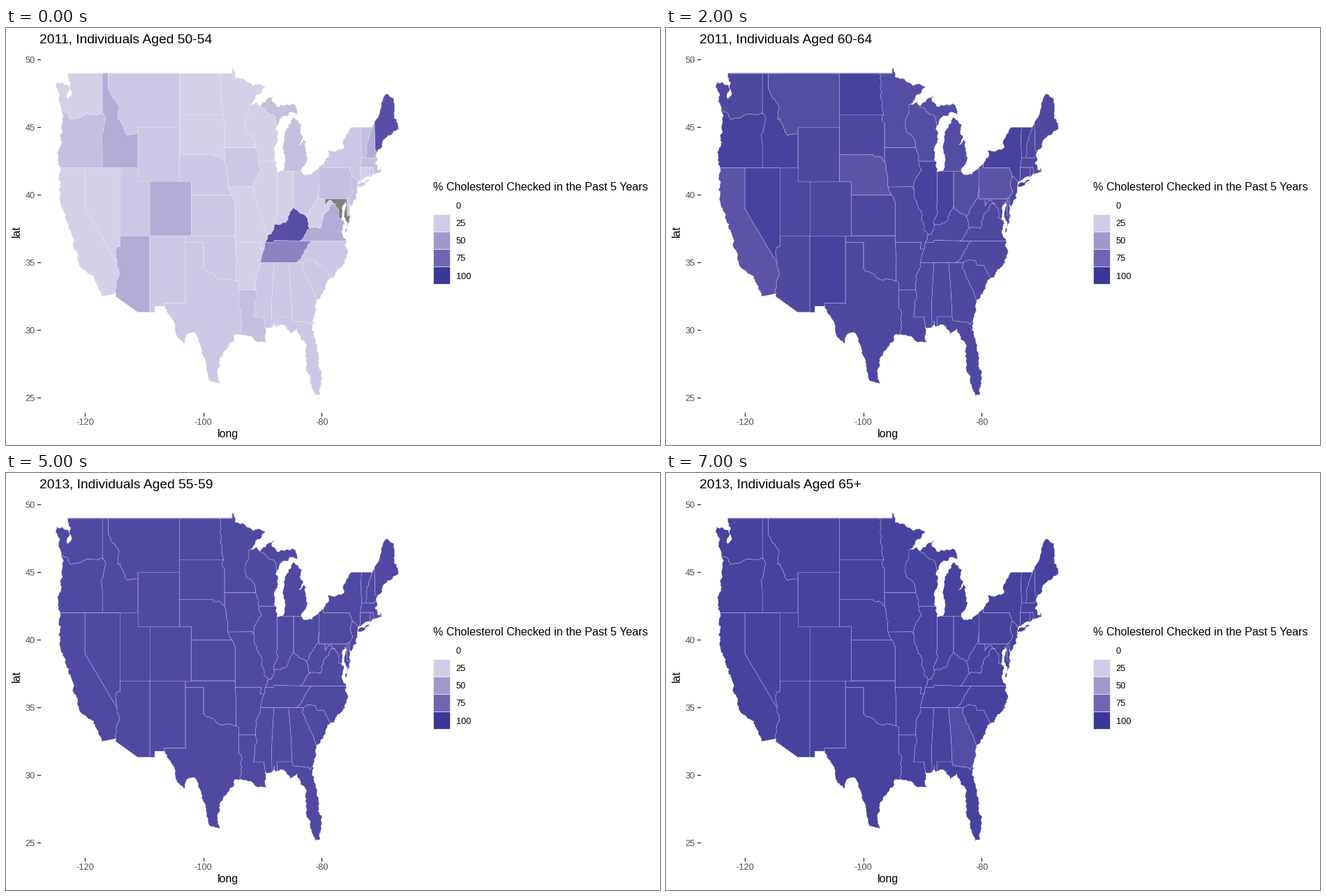
Animation, 937 px wide and 598 px high, one loop 8 s. Source, as a matplotlib script:

```python
import random
from itertools import product

import matplotlib.pyplot as plt
from matplotlib.animation import FuncAnimation
from matplotlib.collections import LineCollection, PolyCollection
from matplotlib.colors import LinearSegmentedColormap
from matplotlib.patches import Rectangle

W, H, DPI = 937, 598, 64
PT = 72 / DPI
plt.rcParams["font.family"] = "Liberation Sans"
rng = random.Random(5)
borders = []  # (states on either side, path in pixels)
pen = (0, 0)


def px(west, lat):
    """Degrees west and degrees north to stage pixels."""
    return 112.8 + (120 - west) * 8.49, 45.2 + (50 - lat) * 19.41


def wiggle(a, b, amp):
    """Points after a up to b, roughened by midpoint displacement."""
    dx, dy = b[0] - a[0], b[1] - a[1]
    size = (dx * dx + dy * dy) ** 0.5
    if size < 3:
        return [b]
    k = rng.uniform(-amp, amp) * min(1, 8 / size)
    mid = ((a[0] + b[0]) / 2 - dy * k, (a[1] + b[1]) / 2 + dx * k)
    return wiggle(a, mid, amp) + wiggle(mid, b, amp)


def move(west, lat):
    global pen
    pen = west, lat


def leg(states, *key, amp=0):
    """Draw a border from the pen through the key points."""
    path = [px(*pen)]
    for point in zip(key[::2], key[1::2]):
        end = px(*point)
        path += wiggle(path[-1], end, amp) if amp else [end]
        move(*point)
    borders.append((states.split(), path))


def river(states, *key):
    leg(states, *key, amp=0.2)


def coast(states, *key):
    leg(states, *key, amp=0.25)


def ew(states, west):
    leg(states, west, pen[1])


def ns(states, lat):
    leg(states, pen[0], lat)


def rings(state):
    """Join the borders of one state into closed rings."""
    left = [path for names, path in borders if state in names]
    found = []
    while left:
        ring = left.pop(0)
        while left and ring[0] != ring[-1]:
            x, y = ring[-1]
            gap = lambda p: abs(p[0] - x) + abs(p[1] - y)
            path = min(left, key=lambda q: min(gap(q[0]), gap(q[-1])))
            left.remove(path)
            ring = ring + (path if gap(path[0]) <= gap(path[-1]) else path[::-1])[1:]
        found.append(ring)
    return found


def trace_outline():
    move(122.8, 49)
    coast("WA", 122.4, 48.2, 122.4, 47.3, 122.85, 47.1, 122.7, 48.1, 124.7, 48.38, 124, 46.3)
    coast("OR", 124.1, 44, 124.5, 42.85, 124.2, 42)
    coast("CA", 124.1, 41, 124.4, 40.4, 123.7, 39, 122.4, 37.4, 121.9, 36.5,
          120.6, 34.6, 118.5, 34, 117.1, 32.5)
    leg("CA", 114.7, 32.7)
    leg("AZ", 114.8, 32.5, 111.07, 31.33, 109.05, 31.33)
    ew("NM", 108.2)
    ns("NM", 31.78)
    ew("NM", 106.5)
    river("TX", 104.9, 30.6, 104.5, 29.6, 103.2, 29, 102.7, 29.7, 101.4, 29.8,
          100.3, 28.3, 99.5, 27.5, 99.1, 26.4, 97.2, 26)
    coast("TX", 97.5, 27.2, 97, 28.05, 95.1, 29.1, 94.8, 29.6, 93.8, 29.7)
    coast("LA", 91.8, 29.5, 90.8, 29.1, 89.1, 29.1, 89.6, 29.6, 89.6, 30.2)
    coast("MS", 88.4, 30.2)
    coast("AL", 88, 30.7, 87.9, 30.3, 87.5, 30.3)
    coast("FL", 86.4, 30.4, 85.3, 29.7, 84.2, 30.1, 82.8, 29.1, 82.7, 27.7, 81.8, 26,
          81.1, 25.15, 80.4, 25.2, 80, 26.8, 81.3, 29.8, 81.5, 30.7)
    coast("GA", 80.9, 32)
    coast("SC", 79.3, 33.1, 78.55, 33.85)
    coast("NC", 77.9, 33.9, 77.3, 34.5, 76.4, 34.8, 75.7, 35.6, 75.9, 36.6)
    coast("VA", 76.4, 37, 76.2, 37.9)
    coast("MD", 76.5, 38.9, 76.1, 39.5, 76.2, 38.6, 75.7, 37.95)
    coast("VA", 76, 37.2, 75.25, 38)
    coast("MD", 75.05, 38.45)
    coast("DE", 75.4, 39.2, 75.4, 39.8)
    coast("NJ", 75.5, 39.5, 74.9, 39, 74.1, 39.8, 74, 40.5, 73.9, 41)
    coast("NY", 73.9, 40.8, 73.65, 41)
    coast("CT", 71.85, 41.3)
    coast("RI", 71.4, 41.6, 71.1, 41.5)
    coast("MA", 70.6, 41.6, 69.95, 41.7, 70.2, 42.05, 70.1, 41.8, 70.6, 41.85, 71, 42.3,
          70.6, 42.65, 70.8, 42.9)
    coast("NH", 70.7, 43.1)
    coast("ME", 69.8, 43.8, 68.8, 44.4, 67, 44.85)
    river("ME", 67.45, 45.6, 67.8, 45.7, 67.8, 47.1, 69.2, 47.45, 70, 46.7, 70.3, 45.9, 71.1, 45.3)
    leg("NH", 71.5, 45)
    ew("VT", 73.3)
    ew("NY", 74.7)
    coast("NY", 76.3, 44.1, 76.2, 43.55, 77.5, 43.27, 79, 43.25, 78.9, 42.8, 79.76, 42.27)
    coast("PA", 80.52, 41.98)
    coast("OH", 81.7, 41.5, 82.7, 41.5, 83.45, 41.76)
    coast("MI", 82.5, 42.6, 82.6, 43.9, 83, 44.1, 83.9, 43.7, 83.3, 44.4, 83.4, 45.2,
          84.8, 45.75, 85.6, 45, 86.2, 44.7, 86.5, 43.7, 86.2, 42.7, 86.8, 41.76)
    coast("IN", 87.53, 41.7)
    coast("IL", 87.8, 42.5)
    coast("WI", 87.9, 43.1, 87.5, 44.4, 87.6, 45.1)
    coast("MI", 86.9, 45.7, 85.4, 46.1, 83.9, 45.95, 84.4, 46.5, 85, 46.75, 86.1, 46.65,
          87.4, 46.5, 88.4, 46.9, 87.8, 47.45, 90.4, 46.55)
    coast("WI", 90.8, 46.9, 92, 46.7)
    coast("MN", 91.2, 47.25, 89.5, 48)
    river("MN", 90.8, 48.2, 91.5, 48.07, 93, 48.55, 94.6, 48.7, 94.9, 49.35)
    leg("MN", 95.15, 49.35, 95.15, 49, 97.2, 49)
    ew("ND", 104.05)
    ew("MT", 116.05)
    ew("ID", 117.04)
    ew("WA", 122.8)
    # Long Island
    move(74, 40.6)
    coast("NY", 73.7, 40.85, 72.4, 41.1, 71.9, 41.07, 72.7, 40.75, 74, 40.6)


def trace_west():
    move(124, 46.3)
    river("WA OR", 122.9, 46.05, 122.5, 45.6, 121.1, 45.65, 119.2, 45.95, 116.92, 46)
    river("ID OR", 116.5, 45.5, 117.2, 44.4, 117.04, 43.8)
    ns("ID OR", 42)
    move(117.04, 49)
    ns("WA ID", 46.4)
    river("WA ID", 116.92, 46)
    move(124.2, 42)
    ew("OR CA", 120)
    ew("OR NV", 117.04)
    ew("ID NV", 114.05)
    ew("ID UT", 111.05)
    ns("ID WY", 44.5)
    river("ID MT", 112.8, 44.4, 113.4, 44.9, 114, 45.65, 114.5, 45.6, 114.35, 46.7,
          115.6, 47.4, 116.05, 48)
    ns("ID MT", 49)
    move(120, 42)
    ns("CA NV", 39)
    leg("CA NV", 114.6, 35)
    river("CA AZ", 114.2, 34.3, 114.7, 33.4, 114.7, 32.7)
    move(114.6, 35)
    river("NV AZ", 114.7, 36.1, 114.05, 36.2)
    ns("NV AZ", 37)
    ns("NV UT", 42)
    move(114.05, 37)
    ew("UT AZ", 109.05)
    ew("CO NM", 103.05)
    ew("CO OK", 102.05)
    ew("KS OK", 94.62)
    ns("MO OK", 36.5)
    leg("MO AR", 90.2, 36.5, 90.4, 36, 89.7, 36)
    move(109.05, 31.33)
    ns("AZ NM", 37)
    ns("UT CO", 41)
    ew("UT WY", 111.05)
    ns("UT WY", 42)
    move(109.05, 41)
    ew("CO WY", 104.05)
    ew("CO NE", 102.05)
    ns("CO NE", 40)
    ns("CO KS", 37)
    move(104.05, 49)
    ns("MT ND", 45.94)
    ns("MT SD", 45)
    ns("WY SD", 43)
    ns("WY NE", 41)
    move(104.05, 45)
    ew("MT WY", 111.05)
    ns("MT WY", 44.5)


def trace_plains():
    move(106.5, 31.78)
    leg("NM TX", 106.6, 32, 103.05, 32)
    ns("NM TX", 36.5)
    ns("NM OK", 37)
    move(103.05, 36.5)
    ew("OK TX", 100)
    ns("OK TX", 34.56)
    river("OK TX", 98.1, 34.1, 97.2, 33.75, 96, 33.8, 94.48, 33.64)
    river("AR TX", 94.04, 33.55)
    ns("AR TX", 33)
    ns("LA TX", 32)
    river("LA TX", 93.55, 31.15, 93.8, 29.7)
    move(94.62, 36.5)
    leg("AR OK", 94.43, 35.4, 94.48, 33.64)
    move(94.04, 33)
    ew("AR LA", 91.17)
    move(104.05, 45.94)
    ew("ND SD", 96.56)
    river("SD MN", 96.85, 45.6, 96.45, 45.3)
    ns("SD MN", 43.5)
    ns("SD IA", 42.5)
    move(97.2, 49)
    river("ND MN", 96.8, 46.9, 96.56, 45.94)
    move(104.05, 43)
    ew("SD NE", 98.5)
    river("SD NE", 97.9, 42.8, 97, 42.8, 96.45, 42.5)
    river("IA NE", 95.9, 41.2, 95.77, 40.58)
    river("MO NE", 95.3, 40)
    river("KS MO", 94.9, 39.8, 94.62, 39.1)
    ns("KS MO", 37)
    move(102.05, 40)
    ew("NE KS", 95.3)
    move(96.45, 43.5)
    ew("MN IA", 91.22)
    move(95.77, 40.58)
    leg("IA MO", 91.73, 40.6, 91.42, 40.38)


def trace_rivers():
    # Mississippi
    move(92, 46.7)
    leg("MN WI", 92.3, 46.65, 92.3, 46.1)
    river("MN WI", 92.8, 45.6, 92.75, 44.8, 91.3, 43.9, 91.22, 43.5)
    river("IA WI", 90.64, 42.5)
    river("IA IL", 90.2, 41.8, 91.1, 41.2, 91.42, 40.38)
    river("MO IL", 91.4, 39.9, 90.7, 39, 90.2, 38.7, 90.2, 38.1, 89.5, 37.3, 89.13, 37)
    river("MO KY", 89.5, 36.5)
    river("MO TN", 89.7, 36)
    river("AR TN", 90.3, 35)
    river("AR MS", 91.1, 34, 91.17, 33)
    river("LA MS", 91, 32.4, 91.6, 31)
    ew("LA MS", 89.73)
    river("LA MS", 89.6, 30.2)
    # Ohio
    move(80.52, 41.98)
    ns("OH PA", 40.64)
    river("OH WV", 80.8, 39.7, 81.75, 39.1, 82.2, 38.6, 82.6, 38.4)
    river("OH KY", 83.7, 38.65, 84.8, 39.1)
    river("IN KY", 85.4, 38.7, 86, 38, 87.1, 37.8, 88.05, 37.8)
    river("IL KY", 88.5, 37.1, 89.13, 37)
    move(87.53, 41.7)
    ns("IL IN", 39.35)
    river("IL IN", 87.5, 38.6, 88.05, 37.8)
    # Great Lakes
    move(90.64, 42.5)
    ew("WI IL", 87.8)
    move(90.4, 46.55)
    river("WI MI", 88.1, 45.9, 87.6, 45.1)
    move(86.8, 41.76)
    ew("IN MI", 84.8)
    ew("OH MI", 83.45)
    move(84.8, 41.76)
    ns("IN OH", 39.1)


def trace_south():
    move(89.5, 36.5)
    leg("KY TN", 88.07, 36.5, 88.07, 36.65, 83.68, 36.6)
    ew("VA TN", 81.68)
    ew("VA NC", 75.9)
    move(83.68, 36.6)
    river("KY VA", 82, 37.54)
    river("KY WV", 82.6, 38.4)
    move(82, 37.54)
    river("VA WV", 80.3, 37.5, 79.65, 38.5, 78.9, 38.8, 78.3, 39.4, 77.72, 39.3)
    river("VA MD", 77.1, 38.9, 77.2, 38.3, 76.2, 37.9)
    move(75.7, 37.95)
    leg("VA MD", 75.25, 38)
    move(81.68, 36.6)
    river("TN NC", 82.6, 36, 84.32, 35)
    move(83.1, 35)
    ew("GA NC", 84.32)
    ew("GA TN", 85.6)
    ew("AL TN", 88.2)
    ew("MS TN", 90.3)
    move(88.2, 35)
    leg("AL MS", 88.1, 34.9, 88.47, 31.9, 88.4, 30.2)
    move(85.6, 35)
    leg("AL GA", 85.2, 32.9, 85, 31)
    leg("FL GA", 84.86, 30.7, 82.2, 30.57, 82, 30.4, 81.5, 30.7)
    move(87.5, 30.3)
    leg("AL FL", 87.6, 31, 85, 31)
    move(83.1, 35)
    river("GA SC", 83.3, 34.7, 81.5, 33, 80.9, 32)
    move(83.1, 35)
    leg("NC SC", 82.3, 35.2, 81.05, 35.15, 80.8, 34.8, 79.67, 34.8, 78.55, 33.85)


def trace_east():
    move(80.52, 40.64)
    ns("PA WV", 39.72)
    ew("PA WV", 79.48)
    ew("PA MD", 75.79)
    leg("PA DE", 75.4, 39.8)
    river("PA NJ", 74.75, 40.2, 75.2, 40.7, 74.7, 41.36)
    river("PA NY", 75.35, 42)
    ew("PA NY", 79.76)
    ns("PA NY", 42.27)
    move(79.48, 39.72)
    ns("WV MD", 39.2)
    river("WV MD", 78.4, 39.6, 77.72, 39.3)
    move(75.79, 39.72)
    leg("MD DE", 75.7, 38.45, 75.05, 38.45)
    move(74.7, 41.36)
    leg("NY NJ", 73.9, 41)
    move(73.3, 45)
    leg("NY VT", 73.4, 44, 73.27, 42.75)
    leg("NY MA", 73.5, 42.04)
    leg("NY CT", 73.5, 41.3, 73.65, 41)
    move(71.5, 45)
    river("VT NH", 72.1, 44.1, 72.45, 42.75)
    ew("VT MA", 73.27)
    move(72.45, 42.75)
    leg("NH MA", 71.3, 42.7, 70.8, 42.9)
    move(71.1, 45.3)
    leg("NH ME", 71, 43.4, 70.7, 43.1)
    move(73.5, 42.04)
    ew("CT MA", 71.8)
    ew("RI MA", 71.38)
    leg("RI MA", 71.1, 41.5)
    move(71.8, 42.04)
    leg("CT RI", 71.85, 41.3)


for trace in (trace_outline, trace_west, trace_plains, trace_rivers, trace_south, trace_east):
    trace()
STATES = sorted({s for names, _ in borders for s in names})
shapes = [(s, ring) for s in STATES for ring in rings(s)]


def survey(usual, gap=0, pale="", deep="", **other):
    """Value of every state; other maps v<number> or 'missing' to state names."""
    values = dict.fromkeys(STATES, usual)
    values.update((s, usual - gap) for s in pale.split())
    values.update((s, usual + gap) for s in deep.split())
    for key, names in other.items():
        value = None if key == "missing" else int(key[1:])
        values.update(dict.fromkeys(names.split(), value))
    return values


TITLES = [f"{year}, Individuals Aged {age}"
          for year, age in product((2011, 2013), ("50-54", "55-59", "60-64", "65+"))]
SURVEYS = [
    survey(27, 4, "NV CT ND MO WI AR WV WA MN IL IN CA SD", "OR LA NJ MA VT PA MI",
           v40="ID CO AZ NH VA", v60="TN", v87="KY ME", missing="MD"),
    survey(28, 6, "PA IL WY ID MS VA WV MD TN", "MT ND SD IN OK",
           v40="IA MO CO LA SC ME OR TX CT MA", v46="WI", v65="RI"),
    survey(91, 3, "MT MN WI MI OH", "OR ID IL IN NY ND VT NV NM", v85="CA NE PA"),
    survey(94),
    survey(88, 4, "UT MO CO MN MT NE OH AZ SD", "NM VA", v81="SC NJ IN AR MS"),
    survey(90),
    survey(None, v59="NH", v72="WV AR SC ID NV AL GA MN UT", v79="NJ", v83="MI OH"),
    survey(94, v88="GA"),
]
ramp = LinearSegmentedColormap.from_list(
    "ramp", ["#ffffff", "#d0cbe6", "#a097cc", "#7266b3", "#3a3797"])


def shade(value):
    return "#7f7f7f" if value is None else ramp(value / 100)


fig = plt.figure(figsize=(W / DPI, H / DPI), dpi=DPI, facecolor="white")
ax = fig.add_axes([0, 0, 1, 1])
ax.set(xlim=(0, W), ylim=(H, 0))
ax.axis("off")


def label(x, y, text, size, color="black", **kw):
    return ax.text(x, y, text, size=size * PT, color=color, va="baseline", **kw)


fills = PolyCollection([ring for _, ring in shapes], linewidths=0)
ax.add_collection(fills)
ax.add_collection(LineCollection([path for _, path in borders], colors="white",
                                 alpha=0.4, linewidths=0.7 * PT))

for lat in range(25, 51, 5):
    y = px(120, lat)[1]
    ax.plot([44.5, 48.5], [y, y], color="#333333", lw=1.3 * PT)
    label(42, y + 4.7, str(lat), 12.8, "#4d4d4d", ha="right")
for west in (120, 100, 80):
    x = px(west, 25)[0]
    ax.plot([x, x], [551.5, 555.5], color="#333333", lw=1.3 * PT)
    label(x, 569.3, str(-west), 12.8, "#4d4d4d", ha="center")
label(317.5, 587, "long", 16, ha="center")
label(19.5, 292, "lat", 16, ha="center", rotation=90, rotation_mode="anchor")

label(611.5, 233, "% Cholesterol Checked in the Past 5 Years", 16.15)
for i in range(5):
    top = 241.6 + 25.1 * i
    ax.add_patch(Rectangle((612, top), 24.3, 25.1, fc=shade(25 * i), ec="white", lw=0.6 * PT))
    label(644.5, top + 17.6, str(25 * i), 12.8)
title = label(48.5, 22.3, "", 19.3)


def draw(step):
    title.set_text(TITLES[step])
    fills.set_facecolor([shade(SURVEYS[step][s]) for s, _ in shapes])
    return fills, title


anim = FuncAnimation(fig, draw, frames=len(TITLES), interval=1000, repeat=True, repeat_delay=0)
plt.show()
```
